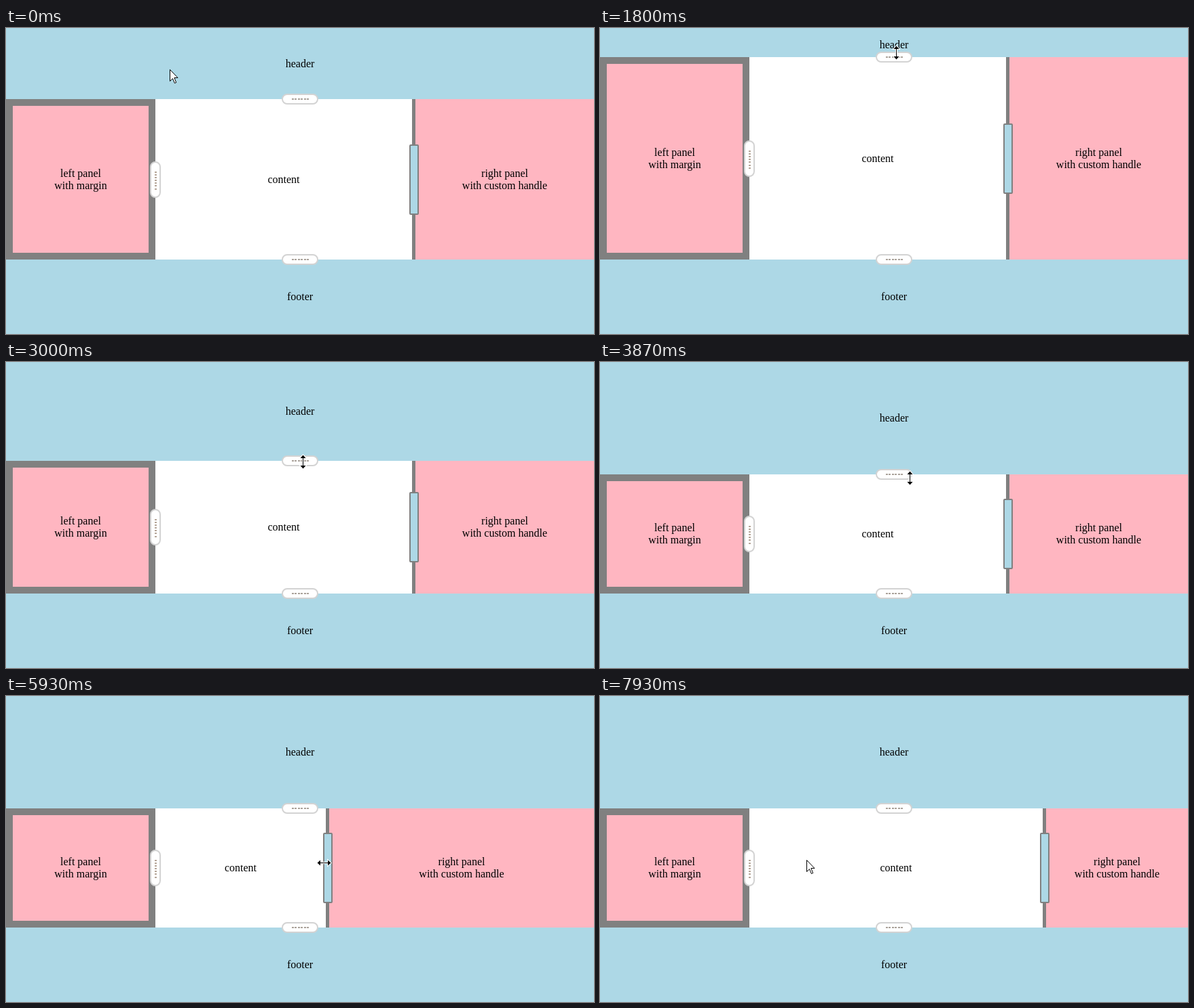
An HTML page for the animation above (8000 ms loop, 866 by 452 pixels).

```html
<!DOCTYPE html>
<html lang="en">
<head>
<meta charset="utf-8">
<title>Resizable panels</title>
<style>
  html, body { margin: 0; width: 100%; height: 100%; overflow: hidden; }
  body { background: #fff; }
  #stage {
    --h: 105px;
    --r: 598px;
    --mid: calc((var(--h) + 342px) / 2);
    position: relative; width: 866px; height: 452px; overflow: hidden;
    font: 16px/18px "Liberation Serif", "Times New Roman", serif;
    color: #000; text-align: center; white-space: nowrap;
  }
  #stage > * { position: absolute; box-sizing: border-box; }
  .panel { display: flex; align-items: center; justify-content: center; }
  .header { left: 0; top: 0; width: 866px; height: max(var(--h), 50px); background: #add8e6; }
  .footer { left: 0; top: 342px; width: 866px; height: 110px; background: #add8e6; }
  .left, .content, .right { top: var(--h); height: calc(342px - var(--h)); }
  .left { left: 0; width: 220px; background: #ffb6c1; border: 10px solid #808080; }
  .content { left: 220px; width: calc(var(--r) - 220px); background: #fff; }
  .right { left: var(--r); right: 0; background: #ffb6c1; border-left: 5px solid #808080; }

  .grip { background: #fff; border: 2px solid #d3d3d3; border-radius: 8px; }
  .grip::after { content: ""; position: absolute; }
  .row { left: 406px; width: 54px; height: 16px; }
  .row::after {
    left: 13px; top: 5px; width: 25px; height: 2px;
    background: repeating-linear-gradient(90deg, #aaa29a 0 3px, #fff 3px 4.4px);
  }
  .col { left: 212px; top: calc(var(--mid) - 27px); width: 16px; height: 54px; }
  .col::after {
    left: 5px; top: 13px; width: 3px; height: 27px;
    background: repeating-linear-gradient(#b5a598 0 2px, #fff 2px 4.1px);
  }
  .upper { top: calc(var(--h) - 8px); }
  .lower { top: 334px; }
  .custom {
    left: calc(var(--r) - 4px); top: calc(var(--mid) - 52px);
    width: 14px; height: 104px;
    background: #add8e6; border: 2px solid #808080; border-radius: 2px;
  }
  #overlay { left: 0; top: 0; }
</style>
</head>
<body>
<div id="stage">
  <div class="panel header">header</div>
  <div class="panel footer">footer</div>
  <div class="panel left">left panel<br>with margin</div>
  <div class="panel content">content</div>
  <div class="panel right">right panel<br>with custom handle</div>
  <div class="grip row upper"></div>
  <div class="grip row lower"></div>
  <div class="grip col"></div>
  <div class="custom"></div>
  <svg id="overlay" width="866" height="452">
    <defs>
      <path id="arrow" d="M.5.5V17.5L4.5 13.7 7.4 20.5 9.7 19.5 6.9 12.5H12Z" fill="#fff" stroke="#000"/>
      <path id="bar" d="M0-10 4-5.5H.5V5.5H4L0 10-4 5.5H-.5V-5.5H-4Z" stroke="#fff" stroke-width="2" paint-order="stroke"/>
      <use id="ns" href="#bar" transform="translate(.5 .5)"/>
      <use id="ew" href="#bar" transform="translate(.5 .5) rotate(90)"/>
    </defs>
    <use id="cursor" href="#arrow"/>
  </svg>
</div>
<script>
  const LOOP = 8000, STEP = 1000 / 15;
  const LAG = 0.5; // steps by which a panel trails the pointer
  const stage = document.getElementById('stage');
  const cursor = document.getElementById('cursor');

  const clamp = u => Math.min(1, Math.max(0, u));
  const ease = u => (1 - Math.cos(Math.PI * clamp(u))) / 2;

  // Steady drag from one value to the next, clamped outside [start, end].
  const pull = (n, start, end, dist) => dist * clamp((n - start) / (end - start));

  const headerEdge = n => 105 + pull(n, 21, 28.3, -75)
    + pull(n, 30.5, 45, 116) + pull(n, 45, 49, 20);

  const rightEdge = n => 598 + pull(n, 82.9, 90.5, -158)
    + pull(n, 91.3, 106.95, 248) + pull(n, 108, 112, -36);

  // Pointer trips: start step, end step, destination.
  const trips = [
    [4, 15, 424, 107],
    [19, 21, 436, 104],
    [21, 49, 437, 164],
    [51, 54, 452, 169],
    [57, 68, 628, 252],
    [71, 77, 605, 248],
    [77, 84, 605, 246],
    [93, 105, 659, 252],
    [112, 119, 304, 242]
  ];

  function pointer(n) {
    let x = 241, y = 61;
    for (const [start, end, toX, toY] of trips) {
      const e = ease((n - start) / (end - start));
      x += (toX - x) * e;
      y += (toY - y) * e;
    }
    if (n > 21 && n < 49) y = headerEdge(n + LAG) - 1.9;
    if (n > 80 && n <= 112) x = rightEdge(n + LAG) + 7;
    return [x, y];
  }

  function cursorKind(n) {
    if (n >= 14 && n < 59) return '#ns';
    if (n >= 77 && n < 113) return '#ew';
    return '#arrow';
  }

  function draw(now) {
    const n = Math.floor((now % LOOP + 3.4) / STEP) % 120;
    const [x, y] = pointer(n).map(Math.round);
    stage.style.setProperty('--h', Math.round(headerEdge(n)) + 'px');
    stage.style.setProperty('--r', Math.round(rightEdge(n)) + 'px');
    cursor.setAttribute('href', cursorKind(n));
    cursor.setAttribute('transform', `translate(${x} ${y})`);
  }

  const start = performance.now();
  function tick() {
    draw(performance.now() - start);
    requestAnimationFrame(tick);
  }
  tick();
</script>
</body>
</html>
```
